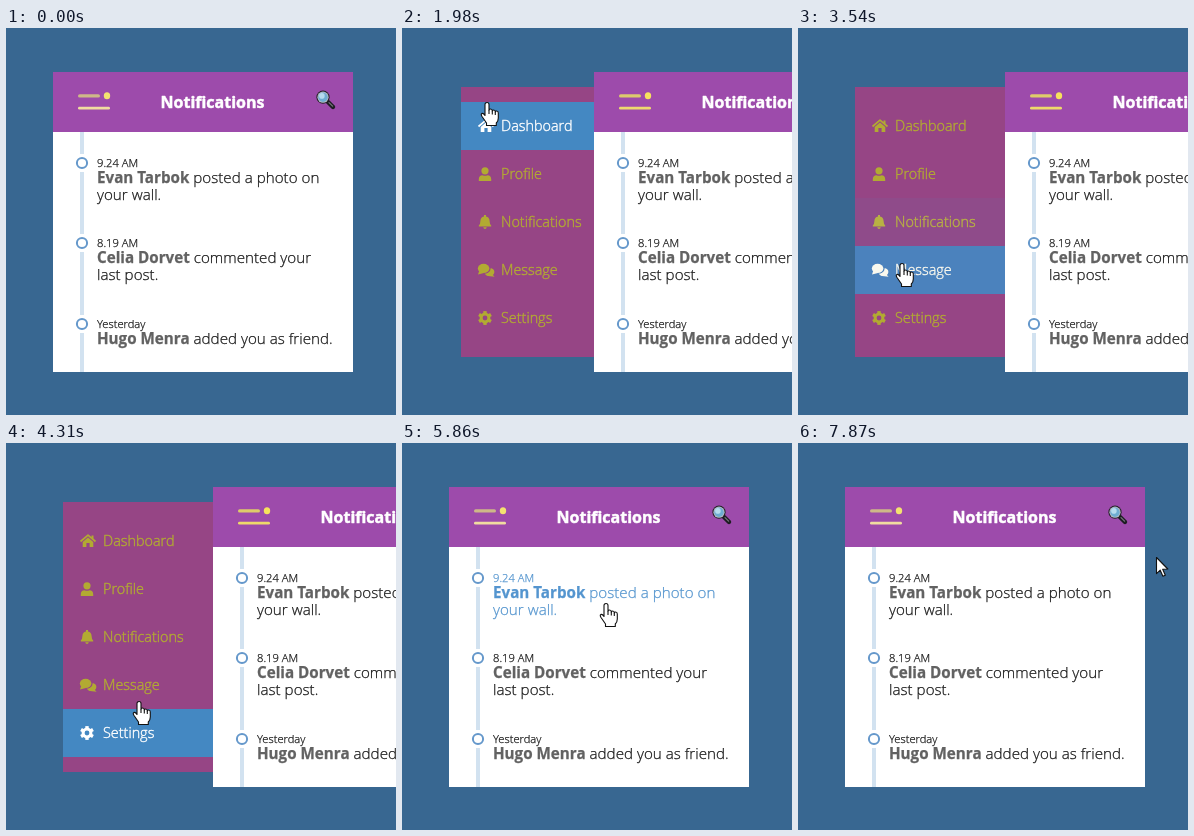
An HTML page with a canvas that plays this animation: 390 by 387 pixels, repeating every 8000 ms.

```html
<!DOCTYPE html>
<html lang="en">
<head>
<meta charset="utf-8">
<title>Notifications</title>
<style>
  html, body { margin: 0; width: 100%; height: 100%; overflow: hidden; background: #386791; }
  canvas { display: block; width: 390px; height: 387px; }
</style>
</head>
<body>
<canvas id="stage"></canvas>
<script>
const W = 390, H = 387, LOOP = 8000;
const canvas = document.getElementById('stage');
const ctx = canvas.getContext('2d');
const dpr = window.devicePixelRatio || 1;
canvas.width = W * dpr;
canvas.height = H * dpr;

const FONT = '"Open Sans", "Noto Sans", sans-serif';
const MENU = [150, 69, 133], MENU_HOVER = [68, 136, 194];
const OLIVE = [178, 170, 50], WHITE = [255, 255, 255];
const BLUE = [92, 132, 236], LINK = [84, 150, 208];

const posts = [
  { y: 135, time: '9.24 AM', name: 'Evan Tarbok', text: ' posted a photo on', more: 'your wall.', hover: [[5600, 5930]] },
  { y: 215, time: '8.19 AM', name: 'Celia Dorvet', text: ' commented your', more: 'last post.', hover: [[6000, 6840]] },
  { y: 296, time: 'Yesterday', name: 'Hugo Menra', text: ' added you as friend.', more: '', hover: [[6900, 7120]] }
];
const rows = [
  { label: 'Dashboard', icon: home, hover: [[1605, 2400]] },
  { label: 'Profile', icon: user, hover: [[2400, 3090], [4590, 4650]] },
  { label: 'Notifications', icon: bell, hover: [[3090, 3335], [4490, 4590]] },
  { label: 'Message', icon: comments, hover: [[3335, 3710], [4360, 4490]] },
  { label: 'Settings', icon: cog, hover: [[3710, 4360]] }
];
const burgerHover = [[1170, 1580], [4860, 5130]];
const handTimes = [[1180, 4600], [5600, 7130]];

// Pointer waypoints: time, x, y
const route = [
  [360, 57, 354], [530, 62, 325], [850, 74, 205], [1160, 83, 88], [1320, 85, 74], [2440, 85, 74],
  [2590, 96, 155], [2910, 96, 155], [3220, 100, 180], [3530, 104, 235], [3990, 107, 289],
  [4155, 107, 289], [4465, 160, 225], [4775, 224, 108], [4930, 241, 74], [5260, 241, 74],
  [5545, 225, 112], [5850, 204, 159], [6010, 202, 200], [6320, 199, 222], [6460, 198, 222],
  [6630, 198, 222], [6785, 206, 238], [6940, 235, 285], [7095, 280, 318], [7250, 335, 334],
  [7400, 371, 330], [7560, 374, 235], [7715, 368, 143], [7865, 358, 114]
];

const clamp = v => Math.max(0, Math.min(1, v));
const mix = (a, b, k) => a.map((v, i) => v + (b[i] - v) * k);
const rgb = c => `rgb(${c.map(Math.round).join(',')})`;
const within = (t, spans) => spans.some(([a, b]) => t >= a && t < b);

// CSS "ease": cubic-bezier(.25, .1, .25, 1)
function ease(x) {
  x = clamp(x);
  let lo = 0, hi = 1, s = x;
  for (let i = 0; i < 22; i++) {
    s = (lo + hi) / 2;
    const bx = 0.75 * s * (1 - s) + s ** 3;
    if (bx < x) lo = s; else hi = s;
  }
  return x === 1 ? 1 : 0.3 * (1 - s) ** 2 * s + 3 * (1 - s) * s * s + s ** 3;
}

// Hover amount with 300 ms fades
const hoverAt = (t, spans) => spans.reduce((m, [a, b]) =>
  Math.max(m, ease((t - a) / 300) * (1 - ease((t - b) / 300))), 0);

const openAt = t => ease((t - 1458) / 800) - ease((t - 5027) / 800);

function stepped(t) {
  if (t < 370) return 0;
  const [from, d] = t < 2600 ? [370, 159.3] : [2600, 155];
  return from + d * Math.floor((t - from) / d);
}

function pointerAt(t) {
  if (t < route[0][0]) return null;
  const i = route.findIndex(p => p[0] > t);
  if (i < 0) return route[route.length - 1].slice(1);
  const a = route[i - 1], b = route[i];
  const k = (t - a[0]) / (b[0] - a[0]);
  return [a[1] + (b[1] - a[1]) * k, a[2] + (b[2] - a[2]) * k];
}

function rect(x, y, w, h, color) {
  ctx.fillStyle = color;
  ctx.fillRect(x, y, w, h);
}

function bar(x, y, w, h, color) {
  ctx.fillStyle = color;
  ctx.beginPath();
  ctx.roundRect(x, y, w, h, h / 2);
  ctx.fill();
}

function disc(x, y, rx, ry = rx) {
  ctx.beginPath();
  ctx.ellipse(x, y, rx, ry, 0, 0, 7);
  ctx.fill();
}

// A hairline stroke gives the type a denser look
function text(str, x, y, size, weight, color, dense = 0.25, align = 'left') {
  ctx.font = `${weight} ${size}px ${FONT}`;
  ctx.textAlign = align;
  ctx.fillStyle = ctx.strokeStyle = color;
  ctx.fillText(str, x, y);
  if (dense) {
    ctx.lineWidth = dense;
    ctx.lineJoin = 'round';
    ctx.strokeText(str, x, y);
  }
  return ctx.measureText(str).width;
}

function home() {
  ctx.lineWidth = 1.7;
  ctx.stroke(new Path2D('M-7.5 .5 L0 -5.8 L7.5 .5'));
  ctx.fill(new Path2D('M-5.3 .9 L0 -3.6 L5.3 .9 V6 H1.6 V2 H-1.6 V6 H-5.3 Z M3.5 -5.5 H5.5 V-1 L3.5 -2.8 Z'));
}

function user() {
  disc(-1, -3.2, 3.6);
  ctx.fill(new Path2D('M-7.2 7 V5 Q-7 1.2 -3.5 1.2 Q-1 2.4 1.5 1.2 Q5 1.2 5.2 5 V7 Z'));
}

function bell() {
  ctx.fill(new Path2D('M-2 -7 H0 V-5.6 Q3.6 -4.8 3.6 -1 Q3.6 2 5.2 3.4 V4.6 H-7.2 V3.4 Q-5.6 2 -5.6 -1 Q-5.6 -4.8 -2 -5.6 Z M-2.8 5.3 H.8 Q.4 7.1 -1 7.1 Q-2.4 7.1 -2.8 5.3 Z'));
}

function comments(back) {
  disc(3.4, 2, 5, 4.1);
  ctx.fill(new Path2D('M6 4 L8.6 6.8 L2 6 Z'));
  const ink = ctx.fillStyle;
  ctx.fillStyle = back;
  disc(-2.2, -1.6, 6.8, 5.4);
  ctx.fillStyle = ink;
  disc(-2.4, -1.6, 5.8, 4.6);
  ctx.fill(new Path2D('M-6.5 0 L-8 4.6 L-2 3 Z'));
}

function cog() {
  ctx.lineWidth = 3;
  ctx.beginPath();
  ctx.arc(-1, 0, 3.9, 0, 7);
  ctx.stroke();
  for (let i = 0; i < 6; i++) {
    ctx.save();
    ctx.translate(-1, 0);
    ctx.rotate(Math.PI / 6 + i * Math.PI / 3);
    ctx.fillRect(4, -1.7, 2.9, 3.4);
    ctx.restore();
  }
}

function drawMenu(t, open) {
  const x = Math.round(77 - 20 * open);
  rect(x, 59, 150, 270, rgb(MENU));
  rows.forEach((row, i) => {
    const k = hoverAt(t, row.hover), y = 74 + i * 48;
    const back = rgb(mix(MENU, MENU_HOVER, k)), ink = rgb(mix(OLIVE, WHITE, k));
    if (k > 0) rect(x, y, 150, 48, back);
    ctx.save();
    ctx.translate(x + 25, y + 24);
    ctx.fillStyle = ctx.strokeStyle = ink;
    row.icon(back);
    ctx.restore();
    text(row.label, x + 40, y + 29, 14.4, 300, ink, 0.4);
  });
}

function drawBurger(t, open) {
  const k = hoverAt(t, burgerHover);
  const tint = (closed, opened) => rgb(mix(mix(closed, opened, open), BLUE, k));
  bar(25, 22.2, 22, 3.4, tint([206, 184, 136], [222, 204, 106]));
  ctx.fillStyle = tint([243, 226, 112], [246, 226, 92]);
  disc(54, 23.7, 3.2, 3.5);
  bar(25, 34.8, 32, 2.8, tint([240, 220, 160], [238, 217, 106]));
}

function drawLens() {
  ctx.lineCap = 'round';
  const line = (x1, y1, x2, y2, w, color) => {
    ctx.strokeStyle = color;
    ctx.lineWidth = w;
    ctx.beginPath();
    ctx.moveTo(x1, y1);
    ctx.lineTo(x2, y2);
    ctx.stroke();
  };
  line(275, 30, 280, 35, 4.4, '#1d1d22');
  line(276, 30.6, 279.6, 34.2, 1.2, '#77777c');
  ctx.lineCap = 'butt';
  ctx.fillStyle = '#202127';
  disc(270, 25.2, 6.6);
  ctx.fillStyle = '#b9bcc4';
  disc(270, 25.2, 5.6);
  ctx.fillStyle = '#6fadd2';
  disc(270, 25.2, 4.7);
  ctx.fillStyle = '#b6dcee';
  disc(268.9, 23.9, 2.8);
}

function drawPost(t, post) {
  const y = post.y - 44, k = hoverAt(t, post.hover);
  const light = rgb(mix([25, 25, 25], LINK, k));
  rect(26, y - 9, 6, 18, '#fff');
  ctx.strokeStyle = '#6598cb';
  ctx.lineWidth = 2;
  ctx.beginPath();
  ctx.arc(29, y, 5.1, 0, 7);
  ctx.stroke();
  text(post.time, 44, y + 4, 11.2, 300, light);
  const w = text(post.name, 44, y + 20, 15.2, 700, rgb(mix([98, 98, 98], LINK, k)));
  text(post.text, 44 + w, y + 20, 15.2, 300, light);
  text(post.more, 44, y + 37, 15.2, 300, light);
}

function drawPanel(t, open) {
  ctx.save();
  ctx.translate(47 + Math.round(160 * open), 44);
  rect(0, 0, 300, 300, '#fff');
  rect(0, 0, 300, 60, '#9d4bab');
  rect(27, 60, 4, 240, '#d2e2f0');
  drawBurger(t, open);
  text('Notifications', 159.5, 36, 16, 700, '#fff', 0.5, 'center');
  drawLens();
  posts.forEach(p => drawPost(t, p));
  ctx.restore();
}

const ARROW = new Path2D('M.5 .5 V16.6 L4.2 13.2 L6.9 19.3 L9.3 18.2 L6.7 12.3 L11.8 12 Z');
const HAND = new Path2D('M-2 2.5 a2 2 0 0 1 4 0 V8 q0 -1 1.6 -1 q1.7 0 1.7 2 q0 -1 1.4 -1 q1.6 0 1.6 2 q.2 -1 1.3 -1 q1.7 0 1.7 2 V16 q0 3 -2 5 V23.5 H-.5 V21 L-5 14.5 Q-6.5 12 -5 11.4 Q-3.5 11 -2 13.5 Z');
const CREASES = new Path2D('M2 8 V12 M5.3 9 V12.5 M8.3 10 V13');

function drawPointer(t) {
  const pos = pointerAt(t);
  if (!pos) return;
  const hand = within(t, handTimes);
  ctx.save();
  ctx.translate(Math.round(pos[0]), Math.round(pos[1]));
  ctx.fillStyle = '#fff';
  ctx.strokeStyle = '#111';
  ctx.lineWidth = 1.1;
  ctx.lineJoin = 'round';
  ctx.fill(hand ? HAND : ARROW);
  ctx.stroke(hand ? HAND : ARROW);
  if (hand) ctx.stroke(CREASES);
  ctx.restore();
}

const start = performance.now();

function frame() {
  const t = stepped((performance.now() - start) % LOOP);
  const open = openAt(t);
  ctx.setTransform(dpr, 0, 0, dpr, 0, 0);
  rect(0, 0, W, H, '#386791');
  if (open > 0) drawMenu(t, open);
  drawPanel(t, open);
  drawPointer(t);
  requestAnimationFrame(frame);
}
frame();
</script>
</body>
</html>
```
